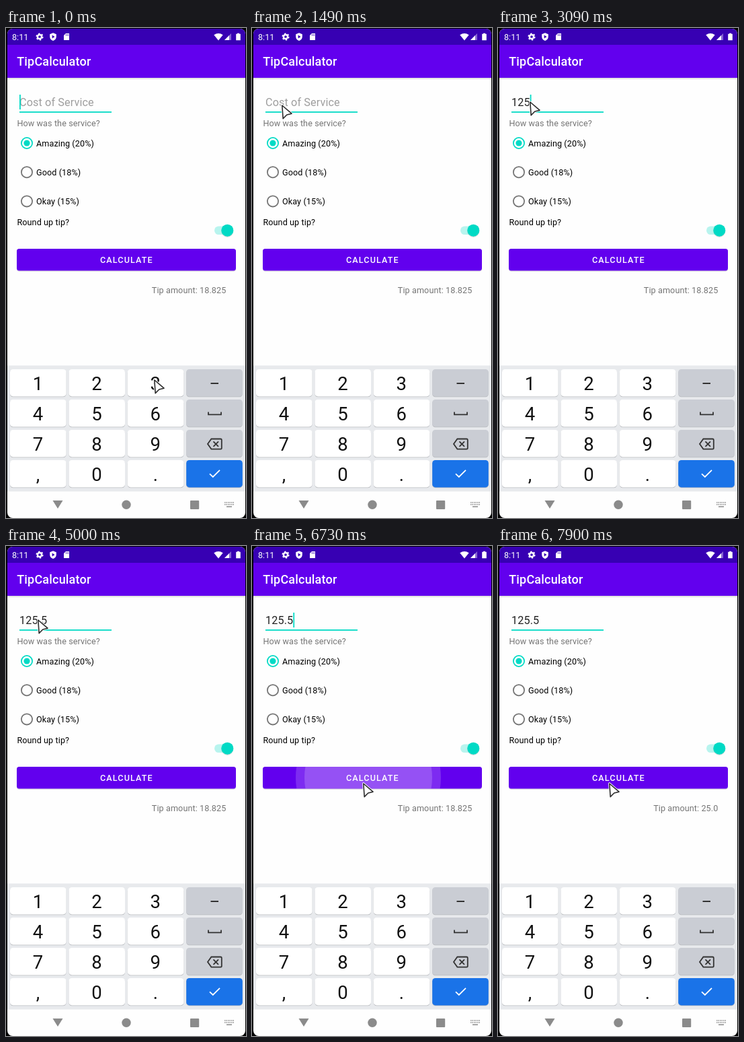
Animation, 357 px wide and 728 px high, one loop 8000 ms. Source, as an HTML page:

```html
<!DOCTYPE html>
<html lang="en">
<head>
<meta charset="utf-8">
<title>Tip calculator</title>
<style>
  html, body { margin: 0; width: 100%; height: 100%; overflow: hidden; background: #000; }
  svg { display: block; font-family: Roboto, sans-serif; }
  .body { font-size: 12.6px; letter-spacing: .1px; }
  .field { font-size: 16.2px; letter-spacing: .12px; }
  .title { font-size: 18px; font-weight: 500; letter-spacing: .18px; fill: #fff; }
  .caps { font-size: 12.6px; font-weight: 500; letter-spacing: 1.124px; fill: #fff; }
  .digit { font-size: 27.5px; text-anchor: middle; fill: #111; }
  .muted { fill: #757575; }
  .line { fill: none; stroke-width: 1.8; }
</style>
</head>
<body>
<svg width="357" height="728" viewBox="0 0 357 728">
  <defs>
    <clipPath id="screen"><rect x="2" y="1" width="354" height="727" rx="8"/></clipPath>
    <clipPath id="buttonShape"><rect x="16" y="328" width="326" height="32.4" rx="3.6"/></clipPath>
    <linearGradient id="barShadow" x2="0" y2="1">
      <stop stop-opacity=".16"/><stop offset="1" stop-opacity="0"/>
    </linearGradient>
    <filter id="shadow" x="-20%" y="-20%" width="140%" height="160%">
      <feDropShadow dx="0" dy=".8" stdDeviation=".6" flood-opacity=".25"/>
    </filter>
    <path id="arrow" d="M1.8 2 16 14.2 8.8 16 3.2 21.6Z" stroke-linejoin="round"/>
  </defs>

  <g clip-path="url(#screen)">
    <rect width="357" height="728" fill="#fefefe"/>
    <rect y="74" width="357" height="3" fill="url(#barShadow)"/>
    <rect width="357" height="25" fill="#3700b3"/>
    <rect y="25" width="357" height="49" fill="#6200ee"/>

    <!-- Status bar -->
    <g fill="#fff">
      <text x="9" y="17.5" font-size="12.6">8:11</text>
      <g fill="none" stroke="#fff">
        <circle cx="50" cy="13" r="3.1" stroke-width="2.5"/>
        <circle cx="50" cy="13" r="4.7" stroke-width="1.7" stroke-dasharray="2.4 2.52"/>
      </g>
      <path d="M70 7.3 74.8 9.2V13Q74.6 17.3 70 19Q65.4 17.3 65.2 13V9.2Z"/>
      <path d="M68.6 10.4 72.5 12.9 68.6 15.4Z" fill="#3700b3"/>
      <path d="M89 8H94V18H86V11Z"/>
      <path d="M89.2 9.3V11.5M91 9.3V11.5M92.7 9.3V11.5" stroke="#3700b3" stroke-width=".8"/>
      <path d="M309.3 10.2Q316 5.6 322.7 10.2L316 18.4Z"/>
      <path d="M325 18 335 8V18Z" opacity=".4"/>
      <path d="M325 18 332 11V18Z"/>
      <path d="M344 7.8H347V8.8H348.8V18.3H342.2V8.8H344Z"/>
    </g>
    <text class="title" x="16.2" y="56">TipCalculator</text>

    <!-- Form -->
    <text id="field" class="field" x="20" y="116"></text>
    <rect x="20" y="124" width="137" height="1.8" fill="#03dac5"/>
    <rect id="caret" y="99" width="1.8" height="22" fill="#03dac5"/>
    <text class="body muted" x="16.4" y="146">How was the service?</text>
    <g id="radios"></g>
    <text class="body" x="16.4" y="293">Round up tip?</text>
    <rect x="310" y="294.4" width="28" height="12.6" rx="6.3" fill="#b8f4ee"/>
    <circle cx="329.3" cy="300.7" r="9" fill="#03dac5" filter="url(#shadow)"/>

    <rect x="16" y="328" width="326" height="32.4" rx="3.6" fill="#6200ee" filter="url(#shadow)"/>
    <g clip-path="url(#buttonShape)" fill="#fff">
      <circle id="outerRipple" cx="173" cy="344"/>
      <circle id="innerRipple" cx="173" cy="344"/>
    </g>
    <text class="caps" x="179.4" y="348.8" text-anchor="middle">CALCULATE</text>
    <text id="tip" class="body muted" x="327.4" y="394" text-anchor="end"></text>

    <!-- Keyboard -->
    <rect y="501.5" width="357" height="187" fill="#e8eaed"/>
    <g id="keys"></g>
    <g class="line" stroke="#333">
      <path d="M304.5 528H316" stroke-width="2.2"/>
      <path d="M301 570.5V574.3H320V570.5"/>
      <path d="M305.4 610.5H319.2Q320.8 610.5 320.8 612V624Q320.8 625.6 319.2 625.6H305.4L300 618ZM308.5 614.3 316 621.8M316 614.3 308.5 621.8"/>
      <path d="M303 662.3 307.8 667 318 656.8" stroke="#fff"/>
    </g>

    <!-- Navigation bar -->
    <g fill="#8b8b8b">
      <path d="M69.5 702H84.5L77 714Z"/>
      <circle cx="179" cy="708.3" r="6.7"/>
      <rect x="274" y="702" width="13.2" height="13" rx="1"/>
    </g>
    <path d="M325 705H339M325 708H339" stroke="#8b8b8b" stroke-width="1.5" stroke-dasharray="1.5 1"/>
    <path d="M328 711.2H336" stroke="#8b8b8b" stroke-width="1.5"/>
  </g>

  <g id="pointer" fill="#fff">
    <use href="#arrow" stroke="#fff" stroke-width="3.4"/>
    <use href="#arrow" stroke="#2b2b2b" stroke-width="1.6"/>
  </g>
</svg>

<script>
  const LOOP = 8000;
  const $ = id => document.getElementById(id);

  // Each track is a list of [time, ...values]; values hold until the next entry.
  const typed = [[0, ''], [2690, '1'], [2970, '12'], [3090, '125'], [4190, '125.'], [4470, '125.5']];
  const caretToggles = [400, 940, 1340, 1850, 2440, 2690, 3670, 4070, 5000, 5400, 5910, 6460, 7000, 7400, 7900];
  const tips = [[0, '18.825'], [6880, '25.0']];
  const ripples = [ // outer radius, outer opacity, inner radius, inner opacity
    [0, 0, 0, 0, 0], [6730, 108, .17, 95, .18], [6880, 200, .32, 0, 0], [7000, 200, .23, 0, 0], [7120, 0, 0, 0, 0]
  ];
  const pointerPath = [
    [0, 219, 521], [800, 164, 362], [940, 137, 325], [1070, 104, 279], [1210, 75, 207], [1340, 54, 147],
    [1490, 43, 113], [1610, 45, 110], [1730, 46, 108],
    [5400, 100, 122], [5520, 172, 163], [5660, 179, 235], [5790, 165, 305], [5910, 154, 339], [6030, 154, 346],
    [6180, 164, 351]
  ];
  const at = (track, time) => track.findLast(([start]) => start <= time).slice(1);

  const caretX = text => [...text].reduce((x, c) => x + (c === '.' ? 4.4 : 9.23), 20);

  $('radios').innerHTML = ['Amazing (20%)', 'Good (18%)', 'Okay (15%)'].map((label, i) => {
    const y = 171 + i * 43.2;
    const ring = `<circle class="line" cx="31" cy="${y}" r="8.1" stroke="${i ? '#757575' : '#03dac5'}"/>`;
    const dot = i ? '' : `<circle cx="31" cy="${y}" r="4.6" fill="#03dac5"/>`;
    return `${ring}${dot}<text class="body" x="45" y="${y + 4.7}">${label}</text>`;
  }).join('');

  $('keys').innerHTML = ['123 ', '456 ', '789 ', ',0. '].map((row, r) => [...row].map((key, c) => {
    const x = 6 + c * 87.4, y = 507 + r * 45;
    const fill = c < 3 ? '#fff' : r < 3 ? '#cacdd4' : '#1a73e8';
    return `<rect x="${x}" y="${y + .8}" width="83.6" height="40.4" rx="4.5" fill="#b9bbbf"/>
      <rect x="${x}" y="${y}" width="83.6" height="40.4" rx="4.5" fill="${fill}"/>
      <text class="digit" x="${x + 41.5}" y="${y + 30.7}">${key}</text>`;
  }).join('')).join('');

  function setRipple(id, radius, opacity) {
    $(id).setAttribute('r', radius);
    $(id).setAttribute('opacity', opacity);
  }

  function render(time) {
    const [text] = at(typed, time);
    $('field').textContent = text || 'Cost of Service';
    $('field').setAttribute('fill', text ? '#212121' : '#9e9e9e');

    const toggled = caretToggles.filter(t => t <= time).length;
    $('caret').setAttribute('x', caretX(text));
    $('caret').setAttribute('visibility', toggled % 2 ? 'hidden' : 'visible');

    const [outer, outerOpacity, inner, innerOpacity] = at(ripples, time);
    setRipple('outerRipple', outer, outerOpacity);
    setRipple('innerRipple', inner, innerOpacity);

    $('tip').textContent = `Tip amount: ${at(tips, time)[0]}`;
    $('pointer').setAttribute('transform', `translate(${at(pointerPath, time)})`);
  }

  function frame() {
    render(performance.now() % LOOP);
    requestAnimationFrame(frame);
  }
  frame();
</script>
</body>
</html>
```
